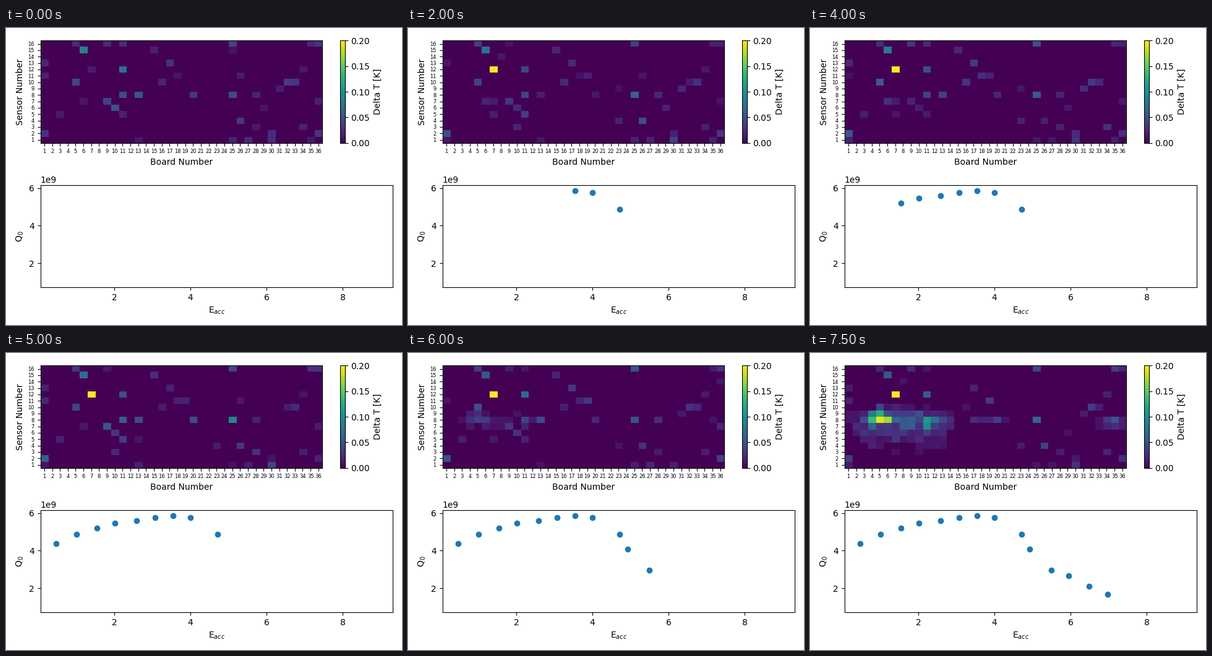
Animation of 640x480 px, one loop 8000 ms. Source, as a matplotlib script:

```python
import numpy as np
import matplotlib.pyplot as plt
from matplotlib.animation import FuncAnimation

FRAMES, INTERVAL = 16, 500
BOARDS, SENSORS = 36, 16
T_MAX = 0.2
FIRST_POINT = 2      # step at which the first Q0 value appears
HEAT_START = 10      # last step before the surface starts to warm up
CUTOFF = 0.009       # smaller readings count as zero

# (board, sensor, mean reading in K) of the sensors that stand out
STEADY = [(6, 15, .07), (25, 8, .065), (11, 12, .055), (1, 2, .04),
          (11, 8, .04), (25, 16, .039), (5, 10, .039), (9, 7, .036),
          (13, 8, .035), (10, 6, .034), (26, 4, .033), (20, 8, .03)]
DEFECT = (11, 6)     # row, column of the quench spot

# (E_acc, Q0 / 1e9) in the order of measurement
CURVE = np.array([(4.71, 4.885), (3.995, 5.765), (3.545, 5.865),
                  (3.07, 5.765), (2.585, 5.6), (2.015, 5.47), (1.54, 5.21),
                  (1.005, 4.88), (.47, 4.385), (4.92, 4.09), (5.49, 2.97),
                  (5.95, 2.68), (6.48, 2.12), (6.97, 1.69)])


def bump(board, sensor, wide, tall):
    s, b = np.mgrid[1:SENSORS + 1, 1:BOARDS + 1]
    return np.exp(-((b - board) / wide) ** 2 - ((s - sensor) / tall) ** 2)


def mean_levels(rng):
    """Weak readings at random places plus the steady sensors."""
    levels = np.zeros(SENSORS * BOARDS)
    weak = rng.choice(levels.size, 45, replace=False)
    levels[weak] = rng.uniform(.003, .025, weak.size)
    levels = levels.reshape(SENSORS, BOARDS)
    for board, sensor, level in STEADY:
        levels[sensor - 1, board - 1] = level
    return levels


setup = np.random.default_rng(5)
base = mean_levels(setup)
heat = (.14 * bump(5.4, 8.2, 1.9, 1.2) + .085 * bump(11, 7.8, 2.3, 1.2)
        + .026 * bump(6.5, 6.3, 7.5, 3.2) + .03 * bump(19, 8, 2.5, .5)
        + .06 * bump(34.6, 7.6, 1.3, 1)) * setup.uniform(.4, 1.4, base.shape)


def delta_t(step):
    rng = np.random.default_rng(100 + step)
    noise = rng.normal(size=base.shape).clip(-1.6, 1.6)
    temp = np.where(base > 0, base + noise * (.22 * base + .004), 0)
    growth = max(0, (step - HEAT_START) / (FRAMES - 1 - HEAT_START)) ** 1.8
    temp = np.maximum(temp, heat * growth)
    temp[DEFECT] = T_MAX if step >= FIRST_POINT else .015
    return np.where(temp < CUTOFF, 0, temp)


fig, (ax_map, ax_q) = plt.subplots(2, 1, figsize=(6.4, 4.8), dpi=100)

image = ax_map.imshow(delta_t(0), origin="lower", aspect="auto",
                      interpolation="nearest", cmap="viridis",
                      vmin=0, vmax=T_MAX,
                      extent=(.5, BOARDS + .5, .5, SENSORS + .5))
ax_map.set_xticks(range(1, BOARDS + 1))
ax_map.set_yticks(range(1, SENSORS + 1))
ax_map.tick_params(labelsize=6)
ax_map.set_xlabel("Board Number")
ax_map.set_ylabel("Sensor Number")
bar = fig.colorbar(image, ax=ax_map, label="Delta T [K]")
bar.set_ticks(np.linspace(0, T_MAX, 5))

dots, = ax_q.plot([], [], "o", color="tab:blue")
ax_q.set_xlim(.06, 9.31)
ax_q.set_ylim(.71e9, 6.15e9)
ax_q.set_xticks([2, 4, 6, 8])
ax_q.set_yticks([2e9, 4e9, 6e9])
ax_q.set_xlabel("E$_{acc}$")
ax_q.set_ylabel("Q$_0$")

fig.tight_layout()


def update(step):
    image.set_data(delta_t(step))
    e_acc, q0 = CURVE[:max(0, step - FIRST_POINT + 1)].T
    dots.set_data(e_acc, q0 * 1e9)
    return image, dots


anim = FuncAnimation(fig, update, frames=FRAMES, interval=INTERVAL,
                     repeat=True, repeat_delay=0)
plt.show()
```
